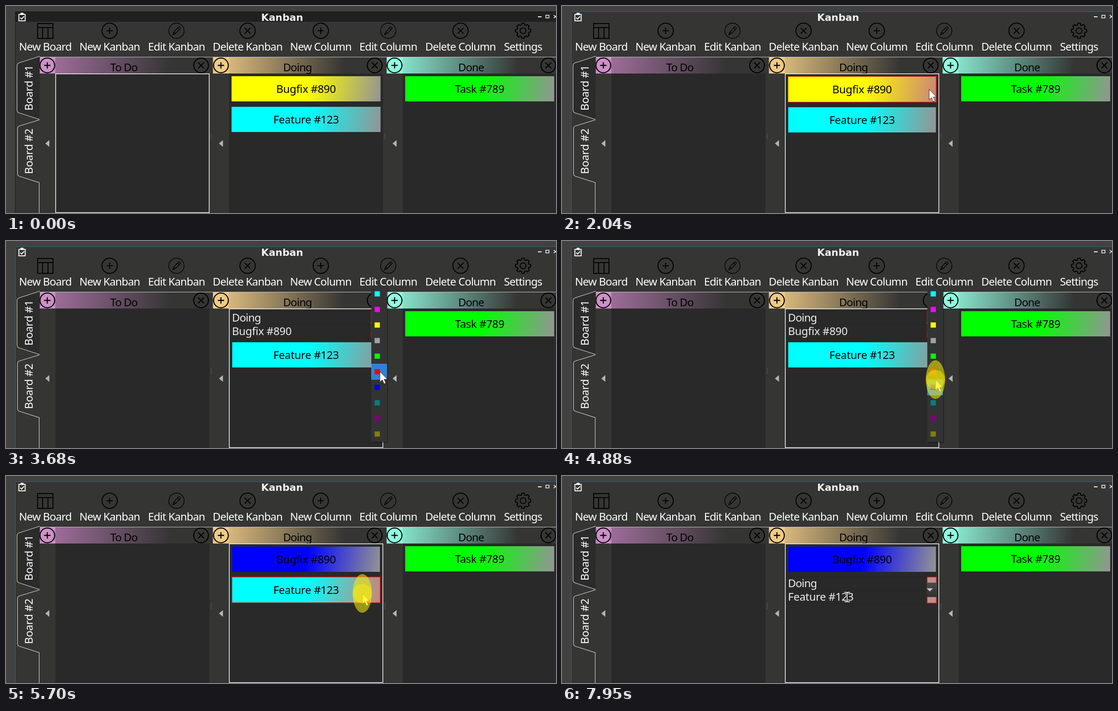
Recreate the animation shown at these times as an HTML page. Size 1218 by 460 pixels, loop 8000 ms.

```html
<!DOCTYPE html>
<html lang="en">
<head>
<meta charset="utf-8">
<title>Kanban</title>
<style>
  html, body { margin: 0; width: 100%; height: 100%; overflow: hidden; background: #41413f; }
  svg { display: block; width: 100%; height: 100%; }
  text { font: 24px "Noto Sans", sans-serif; letter-spacing: -.85px; white-space: pre; }
  .mid { text-anchor: middle; }
  .light { fill: #fff; }
  .title { font: bold 21.8px "DejaVu Sans", sans-serif; letter-spacing: 0; fill: #f0f0f0; }
  .numbered { letter-spacing: -.3px; }
  .icon { fill: none; stroke: #000; stroke-width: 2; }
</style>
</head>
<body>
<svg id="stage" viewBox="0 0 1218 460" preserveAspectRatio="none"></svg>
<script>
const LOOP = 8000;
const LIST = '#292929', PANEL = '#353534';
const SWATCHES = ['#0ff', '#f0f', '#ff0', '#a0a0a4', '#0f0', '#f00', '#00f', '#008080', '#800080', '#808000'];
const COLUMNS = [
  { x: 74, name: 'To Do', color: '#cc90c6', fade: '#ac74a8' },
  { x: 458.5, name: 'Doing', color: '#efca86', fade: '#efca86' },
  { x: 843, name: 'Done', color: '#90fce0', fade: '#92fbe0' }
];
const TOOLS = [
  [87, 'New Board', 'table'], [229.5, 'New Kanban', 'plus'], [377.5, 'Edit Kanban', 'pencil'],
  [535, 'Delete Kanban', 'cross'], [697, 'New Column', 'plus'], [846.5, 'Edit Column', 'pencil'],
  [1006.5, 'Delete Column', 'cross'], [1145, 'Settings', 'gear']
];

// Each entry changes part of the state at its time; the rest carries over.
const TIMELINE = [
  [0, { active: false, focus: 0, selected: -1, editing: -1, popup: -1, click: false,
        cursor: null, beam: false, bugColor: '#ff0' }],
  [420, { cursor: [880, 430] }],
  [620, { cursor: [806, 290] }],
  [820, { cursor: [760, 195] }],
  [1020, { cursor: [754, 181], click: true }],
  [1230, { active: true, focus: 1, selected: 0, click: false }],
  [1440, { cursor: [770, 184] }],
  [1840, { cursor: [794, 185] }],
  [2040, { cursor: [813, 185] }],
  [2240, { editing: 0 }],
  [2660, { popup: 2 }],
  [3060, { cursor: [819, 210], popup: 3 }],
  [3270, { cursor: [826, 243], popup: 4 }],
  [3480, { cursor: [831, 276], popup: 5 }],
  [3680, { cursor: [828, 290] }],
  [4480, { cursor: [827, 308], popup: 6 }],
  [4880, { click: true }],
  [5100, { click: false, popup: -1 }],
  [5500, { cursor: [806, 285] }],
  [5700, { cursor: [789, 261], click: true, editing: -1, selected: 1, bugColor: '#00f' }],
  [5900, { click: false }],
  [6310, { cursor: [803, 258] }],
  [6510, { cursor: [814, 256] }],
  [7330, { editing: 1 }],
  [7540, { cursor: [770, 282] }],
  [7740, { cursor: [682, 276], beam: true }],
  [7950, { cursor: [631.5, 268.5] }]
];

const rect = (x, y, w, h, fill, extra = '') =>
  `<rect x="${x}" y="${y}" width="${w}" height="${h}" fill="${fill}" ${extra}/>`;
const path = (d, extra) => `<path d="${d}" ${extra}/>`;
const text = (x, y, s, cls = '', extra = '') => `<text x="${x}" y="${y}" class="${cls}" ${extra}>${s}</text>`;
const at = (x, y, body) => `<g transform="translate(${x} ${y})">${body}</g>`;
const frame = (x, y, w, h, color, width = 1) =>
  rect(x, y, w, h, 'none', `stroke="${color}" stroke-width="${width}"`);

const PLUS = 'M-7 0H7M0-7V7', CROSS = 'M-6.5-6.5L6.5 6.5M6.5-6.5L-6.5 6.5';
const ring = (r, d, width = 2) =>
  `<g class="icon" style="stroke-width:${width}"><circle r="${r}"/><path d="${d}"/></g>`;

function gearPath() {
  const points = [];
  for (let tooth = 0; tooth < 8; tooth++) {
    for (const [offset, r] of [[-.27, 13.3], [-.17, 17], [.17, 17], [.27, 13.3]]) {
      const a = tooth * Math.PI / 4 + offset;
      points.push(`${(r * Math.cos(a)).toFixed(1)} ${(r * Math.sin(a)).toFixed(1)}`);
    }
  }
  return `M${points.join('L')}Z`;
}

const ICONS = {
  table: path('M-17-16H17V17H-17ZM-17-7H17M-6-7V17M6-7V17', 'class="icon"'),
  plus: ring(17, PLUS),
  cross: ring(17, CROSS),
  pencil: ring(17, 'M-8 9L-6 3L4-8Q6-10 8-7.500Q9-6 8-4.500L-2 6ZM-6 3L-2 6M2.500-6L6.500-3', 1.4),
  gear: path(gearPath(), 'class="icon" stroke-linejoin="round"') + '<circle r="6.500" class="icon"/>'
};

function headerGradient({ x, fade }, i) {
  return `<linearGradient id="head${i}" gradientUnits="userSpaceOnUse" x1="${x}" y1="114" x2="${x + 376}" y2="150">
    <stop stop-color="${fade}"/><stop offset=".77" stop-color="${fade}" stop-opacity="0"/></linearGradient>`;
}

function titleBar(active) {
  const border = active ? '#2c6796' : '#1b1b1b';
  return rect(20, 12, 1198, 448, PANEL) +
    (active ? '' : rect(20, 13, 1198, 22, '#202020')) +
    path('M20.500 460V15Q20.500 12.500 23 12.500H1218', `fill="none" stroke="${border}"`) +
    text(611.5, 33, 'Kanban', 'title mid') +
    path('M28.500 18.500H42.500V33H28.500Z', 'fill="none" stroke="#fff" stroke-width="2" stroke-linejoin="round"') +
    path('M31.500 26L34.500 29L40 23', 'fill="none" stroke="#fff" stroke-width="2"') +
    rect(32, 15, 7, 5, '#fff', 'rx="1.500"') +
    rect(1178, 23, 8, 2, '#fff') + frame(1195.5, 20.5, 7, 6, '#fff', 1.5) +
    path('M1213 20L1220 27M1213 27L1220 20', 'stroke="#fff" stroke-width="1.500"');
}

function toolbar() {
  return TOOLS.map(([x, label, icon]) => at(x, 55, ICONS[icon]) + text(x, 99, label, 'mid light')).join('');
}

function boardTabs() {
  const line = 'stroke="#ddd" stroke-width="1.100"';
  const label = (y, s) => text(0, 0, s, 'mid light numbered', `transform="translate(59 ${y}) rotate(-90)"`);
  return path('M75 111.500L30 126Q24.500 128 24.500 132V231Q24.500 236 29 237.500L74 252', `fill="#2b2b2b" ${line}`) +
    path('M74 253L30 266.500Q25.500 268 25.500 272V373Q25.500 377 30 378.500L73.500 392.500V460', `fill="none" ${line}`) +
    label(182, 'Board #1') + label(323, 'Board #2');
}

function column({ x, name, color }, i) {
  return rect(x + 35.5, 150, 341, 310, LIST) +
    rect(x, 114, 376, 36, `url(#head${i})`) + rect(x, 114, 35, 36, color) +
    at(x + 17.5, 132, ring(16.3, PLUS, 2.3)) + at(x + 358, 132, ring(16.3, CROSS, 2.3)) +
    text(x + 187, 144.5, name, 'mid') +
    path(`M${x + 13} 305.500l9-7.500v15z`, 'fill="#b4b4b4"') +
    path(`M${x + 380.500} 283v13`, 'stroke="#777" stroke-width="1.500" stroke-dasharray="1 1.500"');
}

function card(x, y, w, label, color, selected) {
  const id = `g${label.replace(/\W/g, '')}`;
  const gradient = `<linearGradient id="${id}" gradientUnits="userSpaceOnUse" x1="0" y1="0" x2="${w}" y2="56">
    <stop offset=".5" stop-color="${color}"/><stop offset="1" stop-color="${selected ? '#cc8478' : '#949494'}"/></linearGradient>`;
  return at(x, y, gradient + rect(0, 0, w, 56, `url(#${id})`) +
    (selected ? frame(-1, -1, w + 2, 58, '#a01818', 2) : '') +
    text(w / 2, 36.5, label, 'mid numbered'));
}

function editor(x, y, label) {
  return at(x, y,
    path('M0-1H307M0 28.500H307M0 58.500H307', 'stroke="#242424" fill="none"') +
    text(-.5, 22, 'Doing', '', 'fill="#eee"') + text(-.5, 52, label, 'numbered', 'fill="#eee"') +
    rect(307.5, -1, 21, 59, '#c38d8b') + frame(307.5, -.5, 20.5, 58, '#a82222', 1.5) +
    rect(307, 12, 22, 32, 'url(#combo)') +
    path('M306.500 24.500h14l-7 7z', 'fill="#c4c4c4"'));
}

function doingList(s) {
  const focused = s.focus === 1;
  const [x, shift, w] = focused ? [501, 1, 327] : [499.5, 0, 330];
  return [['Bugfix #890', s.bugColor], ['Feature #123', '#0ff']].map(([label, color], i) => {
    const y = 156 + shift + 68 * i;
    return s.editing === i ? editor(x, y, label) : card(x, y, w, label, color, s.selected === i);
  }).join('');
}

function colorPopup(current) {
  if (current < 0) return '';
  const pitch = 34.6, middle = i => 117.5 + pitch * i;
  return rect(812, 107, 34, 342, '#000', 'opacity=".3"') + rect(809, 101, 35, 345.5, '#333') +
    SWATCHES.map((color, i) =>
      (i === current ? rect(809.5, middle(i) - 17, 33.5, pitch - .6, '#2a82da', 'stroke="#4a96e0"') : '') +
      rect(816.3, middle(i) - 5.8, 11.6, 11.6, color)).join('');
}

function pointer({ cursor, beam, click }) {
  if (!cursor) return '';
  const beamShape = 'M-6-10H-2Q0-10 0-8Q0-10 2-10H6M0-8V9M-6 11H-2Q0 11 0 9Q0 11 2 11H6';
  const shape = beam
    ? path(beamShape, 'fill="none" stroke="#111" stroke-width="4"') +
      path(beamShape, 'fill="none" stroke="#fff" stroke-width="1.800"')
    : path('M0 0V23.500L5.300 18.600L9.200 27.500L13.200 25.700L9.400 17.200H16.500Z',
      'fill="#fff" stroke="#222" stroke-width="1"');
  const glow = '<ellipse rx="21.300" ry="43" fill="#fff000" opacity=".54"/><circle r="21.300" fill="#fff000" opacity=".45"/>';
  return at(...cursor, shape + (click ? glow : ''));
}

function scene(s) {
  return `<defs>${COLUMNS.map(headerGradient).join('')}
    <linearGradient id="combo" x2="0" y2="1"><stop stop-color="#4a4a4a"/><stop offset="1" stop-color="#303030"/></linearGradient></defs>` +
    titleBar(s.active) + toolbar() + COLUMNS.map(column).join('') +
    path('M74 113.500H1218', 'stroke="#ccc"') + boardTabs() +
    frame(COLUMNS[s.focus].x + 36, 150.7, 340, 308.6, '#fff', 1.5) +
    doingList(s) + card(884, 156, 330, 'Task #789', '#0f0', false) +
    colorPopup(s.popup) + pointer(s);
}

const stage = document.getElementById('stage');
let shown = -1;
function tick(now) {
  const time = now % LOOP;
  const step = TIMELINE.filter(([start]) => start <= time).length;
  if (step !== shown) {
    shown = step;
    stage.innerHTML = scene(Object.assign({}, ...TIMELINE.slice(0, step).map(([, change]) => change)));
  }
  requestAnimationFrame(tick);
}
tick(performance.now());
</script>
</body>
</html>
```
